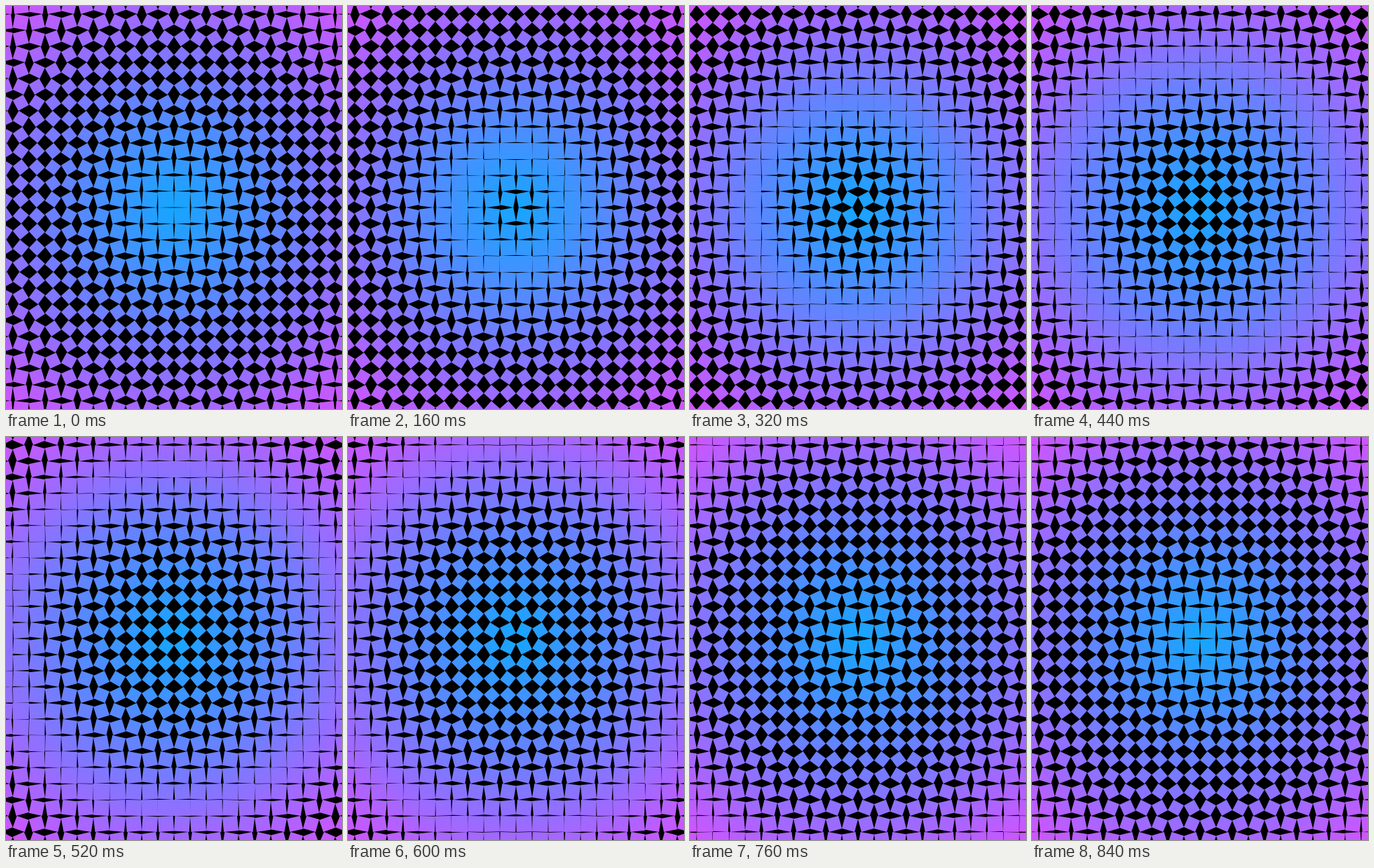
These frames come from a looping animation (500x600 px, 0.88 s). An HTML page with a canvas:

```html
<!DOCTYPE html>
<html lang="en">
<head>
<meta charset="utf-8">
<title>Rotating squares</title>
<style>
  html, body { margin: 0; width: 100%; height: 100%; overflow: hidden; background: #000; }
  canvas { display: block; }
</style>
</head>
<body>
<canvas id="stage" width="500" height="600"></canvas>
<script>
const W = 500, H = 600, CELL = 24;
const LOOP = 880, STEP = 40;
const WAVELENGTH = 410, WAVE_START = 10;
const ctx = document.getElementById('stage').getContext('2d');

const tint = ctx.createRadialGradient(W / 2, H / 2, 0, W / 2, H / 2, 390);
tint.addColorStop(0, 'rgb(20,166,255)');
tint.addColorStop(1, 'rgb(208,84,255)');

// A square inscribed in its cell: each corner slides along one cell edge.
function addSquare(col, row, time) {
  const x = W / 2 + col * CELL, y = H / 2 + row * CELL;
  const distance = Math.hypot(col + 0.5, row + 0.5) * CELL;
  const phase = time / LOOP - (distance - WAVE_START) / WAVELENGTH;
  const turn = phase - Math.floor(phase);
  const a = CELL * ((col + row) % 2 ? 1 - turn : turn);
  const b = CELL - a;
  ctx.moveTo(x + a, y);
  ctx.lineTo(x + CELL, y + a);
  ctx.lineTo(x + b, y + CELL);
  ctx.lineTo(x, y + b);
  ctx.closePath();
}

function draw(now) {
  const time = Math.floor((now % LOOP) / STEP) * STEP;
  ctx.fillStyle = '#000';
  ctx.fillRect(0, 0, W, H);
  ctx.beginPath();
  for (let row = -13; row < 13; row++)
    for (let col = -11; col < 11; col++) addSquare(col, row, time);
  ctx.fillStyle = tint;
  ctx.fill();
  requestAnimationFrame(draw);
}
draw(performance.now());
</script>
</body>
</html>
```
